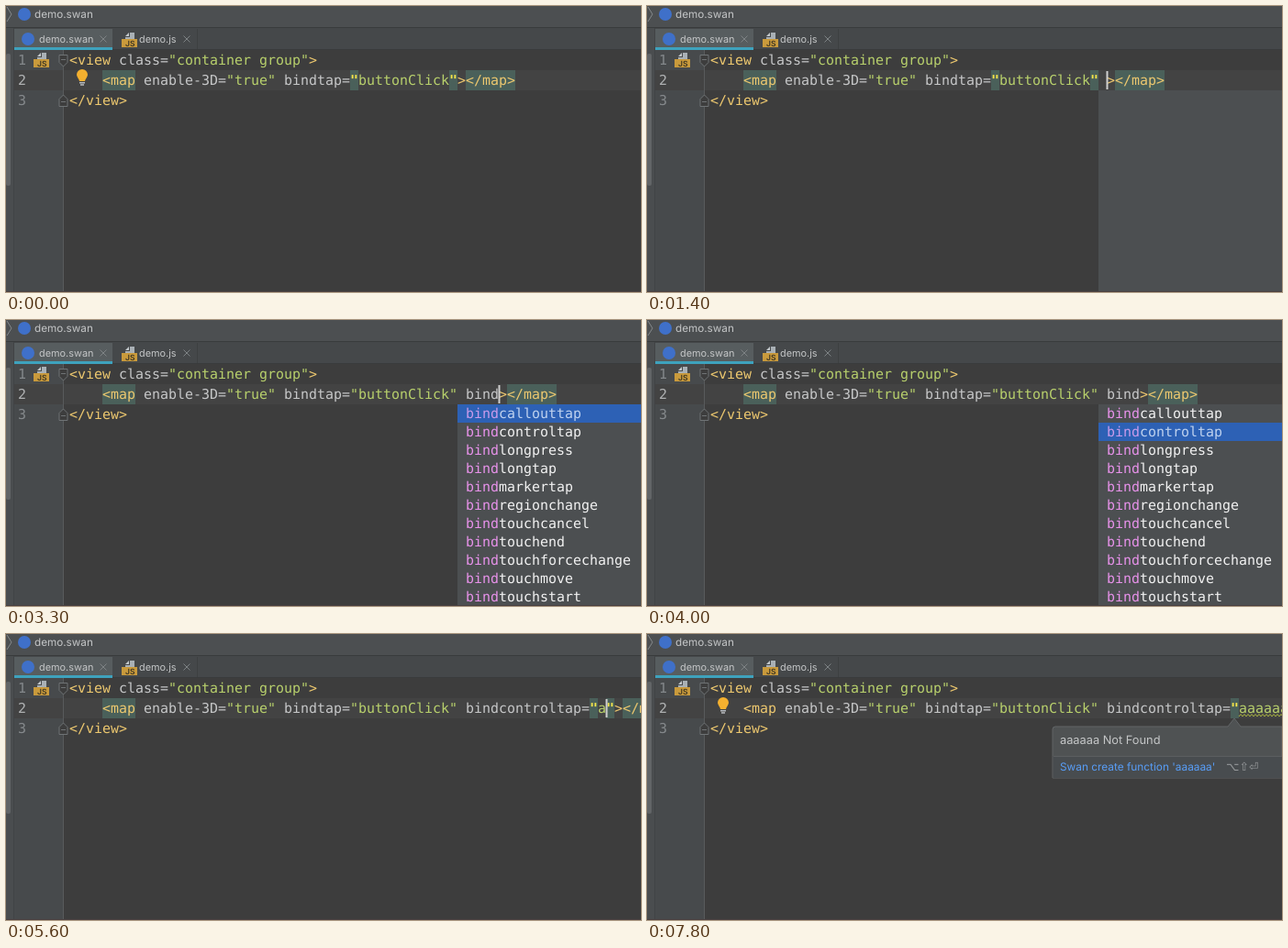
Write an HTML page that moves like this. It is 692 px wide and 312 px high and loops after 8000 ms.

```html
<!DOCTYPE html>
<html lang="en">
<head>
<meta charset="utf-8">
<title>Attribute completion</title>
<style>
  html, body { margin: 0; width: 100%; height: 100%; overflow: hidden; background: #3d3d3d; }
  svg { display: block; width: 692px; height: 312px; }
  text { white-space: pre; text-rendering: geometricPrecision; }
  .code { font: 14.95px "DejaVu Sans Mono", monospace; }
  .bold { font-weight: bold; }
  .ui { font-family: Inter, sans-serif; fill: #c4c6c7; }
</style>
</head>
<body>
<svg viewBox="0 0 692 312">
  <defs>
    <g id="js">
      <path d="M9 0h5v8H4V5h5z" fill="#a9b0b5"/>
      <path d="M8 0v4H4z" fill="#c3c8cb"/>
      <rect y="7" width="17" height="9" fill="#c99a3c"/>
      <text x="4" y="14.6" font-size="8.5" font-weight="600" font-family="Inter, sans-serif" fill="#3b3423">JS</text>
    </g>
    <path id="close" d="M-3.5-3.5l7 7m0-7l-7 7" stroke="#7e8385" fill="none"/>
    <g id="fold" fill="#3d3d3d" stroke="#6f7375">
      <path d="M-4.5-6h9v8L0 6.5-4.5 2z"/>
      <path d="M-2.5-1h5"/>
    </g>
    <g id="bulb">
      <path d="M-3 4C-3 2-6-.5-6-3a6 6 0 0 1 12 0c0 2.500-3 5-3 7z" fill="#f4b02f"/>
      <path d="M-3 5.700h6M-2 8h4" stroke="#b9bcbe" stroke-width="1.500"/>
    </g>
  </defs>

  <rect width="692" height="312" fill="#3d3d3d"/>
  <rect width="692" height="24" fill="#4c4f51"/>
  <rect y="24" width="692" height="24" fill="#45484a"/>
  <path d="M0 23.500h692M0 47.500h692" stroke="#393b3c"/>
  <rect y="24" width="8" height="288" fill="#4a4d4f"/>
  <rect y="52" width="5" height="144" rx="2" fill="#626567"/>
  <rect x="8" y="48" width="54" height="264" fill="#474a4c"/>
  <rect x="8" y="70" width="684" height="22" fill="#434343"/>
  <path d="M62.500 48v264" stroke="#595b5c"/>
  <path d="M8.500 24v288" stroke="#414345"/>

  <path d="M1 1l5 8-5 8" fill="none" stroke="#85898b"/>
  <circle cx="20" cy="9" r="7" fill="#3f70c9"/>
  <text class="ui" x="31" y="13" font-size="11.700">demo.swan</text>

  <rect x="9" y="25" width="107" height="23" fill="#575d5f"/>
  <rect x="9" y="45" width="107" height="3" fill="#3ea2bd"/>
  <circle cx="24" cy="36" r="7" fill="#3f70c9"/>
  <text class="ui" x="36" y="40" font-size="10.900">demo.swan</text>
  <use href="#close" x="106" y="36"/>
  <use href="#js" x="126" y="29"/>
  <text class="ui" x="145" y="40" font-size="10.900">demo.js</text>
  <use href="#close" x="197" y="36"/>
  <path d="M208.500 25v22" stroke="#3d4041"/>

  <g class="code" fill="#85898c">
    <text x="13" y="64">1</text>
    <text x="13" y="86" fill="#b0b2b3">2</text>
    <text x="13" y="108">3</text>
  </g>
  <use href="#js" x="30" y="51"/>
  <use href="#fold" x="62.500" y="59.500"/>
  <use href="#fold" transform="translate(62.500 103.500) scale(1 -1)"/>

  <g id="scene"></g>
  <path d="M0 311.500h692" stroke="#4a4040"/>
</svg>

<script>
const LOOP = 8000, LEFT = 69, CHAR = 9;
const TAG = '#edc86f', ATTR = '#c6c7c8', STRING = '#b8d06c', QUOTE = '#f5e54a', MATCH = '#4a605a';
const SUGGESTIONS = ['callouttap', 'controltap', 'longpress', 'longtap', 'markertap', 'regionchange',
  'touchcancel', 'touchend', 'touchforcechange', 'touchmove', 'touchstart'].map(s => 'bind' + s);

// time, attribute being typed, its value
const EDITS = [
  [100, ''], [1300, ' '], [1600, ' b'], [1900, ' bi'], [2100, ' bin'], [2300, ' bind'],
  [4200, ' bindcontroltap', ''],
  ...[5500, 5700, 5850, 6000, 6150, 6300].map((at, i) => [at, ' bindcontroltap', 'a'.repeat(i + 1)])
];

const scene = document.getElementById('scene');
const between = (t, from, to) => t >= from && t < to;
const escapeText = s => s.replace(/&/g, '&amp;').replace(/</g, '&lt;');
const rect = (x, y, w, h, fill) => `<rect x="${x}" y="${y}" width="${w}" height="${h}" fill="${fill}"/>`;
const code = (x, y, s, fill, cls = '') =>
  `<text class="code ${cls}" x="${x}" y="${y}" fill="${fill}">${escapeText(s)}</text>`;

function codeLine(y, indent, tokens) {
  let x = LEFT + indent * CHAR, out = '';
  for (const [s, fill, matched] of tokens) {
    const w = s.length * CHAR;
    if (matched) out += rect(x, y - 16, w, 22, MATCH);
    out += code(x, y, s, fill, fill === QUOTE ? 'bold' : '');
    x += w;
  }
  return out;
}

function quoted(value, matchOpen, matchClose = matchOpen) {
  const mark = on => ['"', on ? QUOTE : STRING, on];
  return [mark(matchOpen), [value, STRING], mark(matchClose)];
}

function completion(t, prefix) {
  const focused = t >= 2600, selected = t >= 3500 ? 1 : 0;
  let out = rect(492, 92, 200, 220, '#4c4f51');
  if (!prefix) return out;
  out += rect(492, 92 + selected * 20, 200, 20, focused ? '#2d61b5' : '#5d6062');
  SUGGESTIONS.forEach((name, i) => {
    const y = 107 + i * 20, active = focused && i === selected;
    const accent = active ? '#c99bea' : focused ? '#e792ea' : '#ac74b3';
    const plain = active ? '#bfd2ef' : focused ? '#f2f2f2' : '#b4b6b7';
    out += code(501, y, name.slice(0, prefix), accent);
    out += code(501 + prefix * CHAR, y, name.slice(prefix), plain);
  });
  return out;
}

function squiggle() {
  let d = 'M645 90';
  for (let x = 647, up = true; x <= 693; x += 2, up = !up) d += `L${x} ${up ? 87.5 : 90}`;
  return `<path d="${d}" fill="none" stroke="#a9b341"/>`;
}

function tooltip(opacity) {
  return `<g opacity="${opacity.toFixed(2)}">
    <path d="M442 157V104q0-3 3-3H633l7-9 7 9H692V157z" fill="#4f5253" stroke="#626567"/>
    ${rect(442.5, 133, 250, 24, '#484c4f')}
    <path d="M443 133.500H692" stroke="#5b5e60"/>
    <text class="ui" x="450" y="120" font-size="12.800">aaaaaa Not Found</text>
    <text class="ui" x="450" y="149" font-size="11.850" style="fill:#589df6">Swan create function 'aaaaaa'</text>
    <text x="631" y="149" font-size="12.500" font-family="DejaVu Sans, sans-serif" fill="#989b9d">⌥⇧⏎</text>
  </g>`;
}

function draw(t) {
  const [at, name, value] = EDITS.filter(e => e[0] <= t).pop() || EDITS[0];
  const hasValue = value !== undefined;
  const tagMatch = t < 6600, tapMatch = t < 1500;

  let out = codeLine(64, 0, [['<view ', TAG], ['class=', ATTR], ['"container group"', STRING], ['>', TAG]]);
  out += codeLine(86, 4, [
    ['<map', TAG, tagMatch], [' enable-3D=', ATTR], ['"true"', STRING], [' bindtap=', ATTR],
    ...quoted('buttonClick', tapMatch),
    [name + (hasValue ? '=' : ''), ATTR],
    ...(hasValue ? quoted(value, true) : []),
    ['>', TAG], ['</map>', TAG, tagMatch]
  ]);
  out += codeLine(108, 0, [['</view>', TAG]]);

  if (Math.floor((t - at) / 500) % 2 === 0) {
    const column = 47 + name.length + (hasValue ? 2 + value.length : 0);
    out += rect(LEFT + column * CHAR - 0.5, 71, 2, 20, '#d0d0d0');
  }
  if (t < 1300 || t >= 7300) out += '<use href="#bulb" x="83" y="78"/>';
  if (between(t, 1400, 4200)) out += completion(t, name.trim().length);
  if (t >= 6600) out += squiggle();
  if (t >= 7300) out += tooltip(Math.min(1, (t - 7300) / 300));
  return out;
}

let shown = '';
function tick(now) {
  const markup = draw(now % LOOP);
  if (markup !== shown) scene.innerHTML = shown = markup;
  requestAnimationFrame(tick);
}
tick(0);
</script>
</body>
</html>
```
